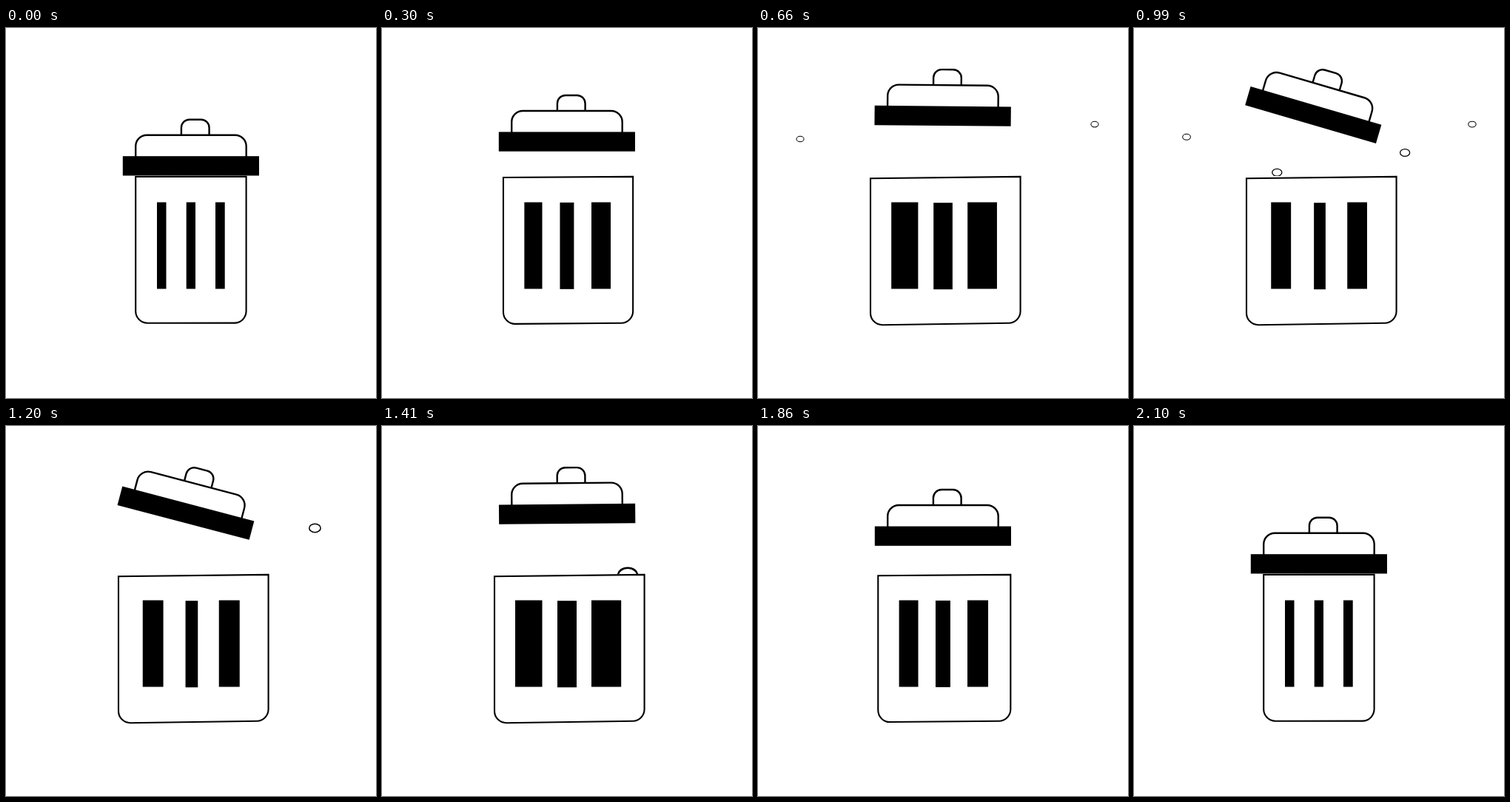
An HTML page with a canvas for the animation above (2.73 s loop, 500 by 500 pixels).

```html
<!DOCTYPE html>
<html lang="en">
<head>
<meta charset="utf-8">
<title>Bin</title>
<style>
  html, body { margin: 0; width: 100%; height: 100%; overflow: hidden; background: #fff; }
  canvas { display: block; width: 500px; height: 500px; }
</style>
</head>
<body>
<canvas width="500" height="500"></canvas>
<script>
const ctx = document.querySelector('canvas').getContext('2d');
const LOOP = 2730, STEP = 30;
const OPEN_END = 540, CLOSE_START = 1650, CLOSE_END = 2100;
const LIFT = 67.5;

const clamp = v => Math.max(0, Math.min(1, v));
const mix = (a, b, p) => a + (b - a) * p;

// Piecewise linear value through [time, value] keys
function track(keys, t) {
  if (t <= keys[0][0]) return keys[0][1];
  for (let i = 1; i < keys.length; i++) {
    const [t0, v0] = keys[i - 1], [t1, v1] = keys[i];
    if (t < t1) return mix(v0, v1, (t - t0) / (t1 - t0));
  }
  return keys[keys.length - 1][1];
}

const TILT = [[649, 0], [1105, 21.8], [1400, 0], [1515, -6], [1640, 0]];

// Left and right edge of each slot: closed, open, squeezed
const SLOTS = [
  { closed: [204, 216.5], open: [180, 216.5], tight: [187, 210.7] },
  { closed: [243.7, 256], open: [237, 263], tight: [245.2, 257.5] },
  { closed: [283, 295.7], open: [283, 323.2], tight: [290, 312.2] }
];

const BALLS = [
  { start: 603, x: 54, dir: 1, pull: 0.00093, grow: 0.011 },
  { start: 897, x: 54, dir: 1, pull: 0.00197, grow: 0.02 },
  { start: 561, x: 460, dir: -1, pull: 0.00051, grow: 0.016 },
  { start: 914, x: 460, dir: -1, pull: 0.00052, grow: 0.063 }
];

function openness(t) {
  if (t < CLOSE_START) return Math.pow(clamp(t / OPEN_END), 1.23);
  const p = clamp((t - CLOSE_START) / (CLOSE_END - CLOSE_START));
  return 1 - Math.pow(p, 1.07);
}

function drawBall(ball, t) {
  const age = t - ball.start;
  if (age < 0 || t > CLOSE_START) return;
  const d = ball.pull * age * age;
  const y = ball.dir > 0
    ? 150.8 - 0.28 * d + 0.0043 * d * d
    : 130 + 70.5 * (d / 127) ** 2;
  if (y > 230) return;
  const r = 5 + ball.grow * d;
  ctx.lineWidth = r * 0.2;
  ctx.beginPath();
  ctx.ellipse(ball.x + ball.dir * d, y, r, r * 0.75, 0, 0, Math.PI * 2);
  ctx.stroke();
}

function drawBalls(t) {
  ctx.save();
  ctx.beginPath();
  ctx.rect(0, 0, 500, 200);
  ctx.clip();
  BALLS.forEach(ball => drawBall(ball, t));
  ctx.restore();
}

function drawBody(p, squeeze) {
  const left = mix(175.2, 152, p), right = mix(324.6, 354.6, p);
  const topLeft = mix(201, 203.2, p), bottomLeft = mix(398.7, 401.4, p);
  ctx.lineWidth = 2.1;
  ctx.beginPath();
  ctx.moveTo(left, topLeft);
  ctx.lineTo(right, 200.9);
  ctx.arcTo(right, 398.6, left, bottomLeft, 16);
  ctx.arcTo(left, bottomLeft, left, topLeft, 16);
  ctx.closePath();
  ctx.stroke();

  SLOTS.forEach((slot, i) => {
    const [a, b] = [0, 1].map(k =>
      mix(mix(slot.closed[k], slot.open[k], p), slot.tight[k], squeeze));
    const drop = i === 1 ? 0.7 * p : 0;
    ctx.fillRect(a, 235.5 + drop, b - a, 117);
  });
}

// Open-bottomed shape with two round upper corners
function cap(left, right, top, bottom, r) {
  ctx.beginPath();
  ctx.moveTo(left, bottom);
  ctx.arcTo(left, top, right, top, r);
  ctx.arcTo(right, top, right, bottom, r);
  ctx.lineTo(right, bottom);
  ctx.stroke();
}

function drawLid(p, tilt) {
  ctx.save();
  ctx.translate(251, 159 - LIFT * p);
  ctx.rotate(tilt * Math.PI / 180);
  ctx.translate(-251, -159);
  ctx.lineWidth = 2.4;
  cap(236.9, 274.6, 123.7, 144.7, 11);
  cap(175.2, 324.7, 144.7, 174, 15);
  ctx.fillRect(157.8, 173.2, 184.2, 26.3);
  ctx.restore();
}

function draw(t) {
  const p = openness(t), tilt = track(TILT, t);
  ctx.fillStyle = '#fff';
  ctx.fillRect(0, 0, 500, 500);
  ctx.fillStyle = ctx.strokeStyle = '#000';
  drawBalls(t);
  drawBody(p, clamp(tilt / 21.8));
  drawLid(p, tilt);
}

const begin = performance.now();
function tick() {
  const t = (performance.now() - begin) % LOOP;
  draw(Math.floor(t / STEP) * STEP);
  requestAnimationFrame(tick);
}
tick();
</script>
</body>
</html>
```
